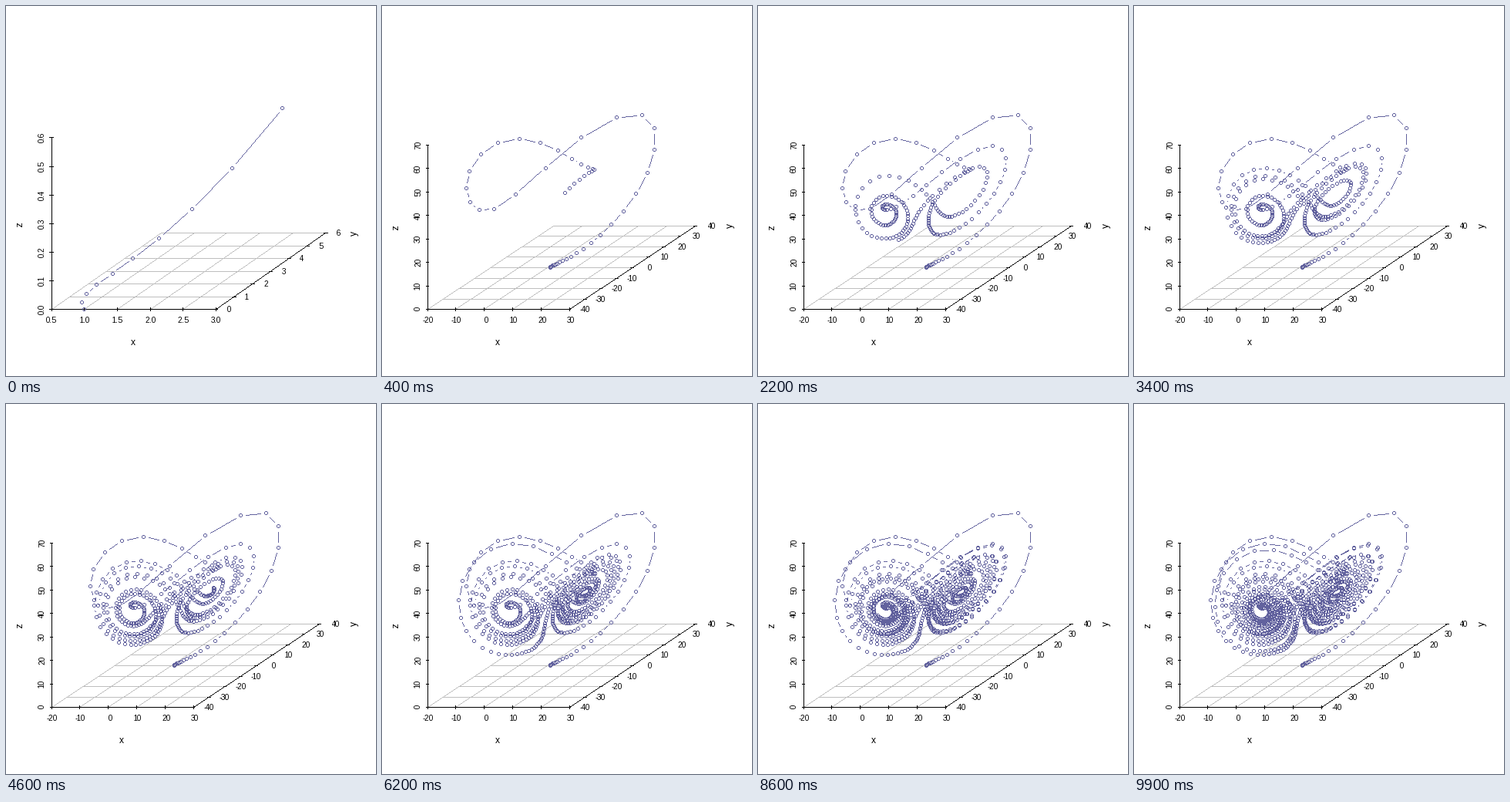
A matplotlib script for the animation above (10000 ms loop, 480 px wide and 480 px high).

```python
import numpy as np
import matplotlib.pyplot as plt
from matplotlib.animation import FuncAnimation

SIZE, DPI = 480, 96
PT = 72 / DPI                       # points per pixel
LINE = 14.4                         # height of one margin line
LEFT, RIGHT = 3.1 * LINE, SIZE - 3.1 * LINE
TOP, BOTTOM = 4.1 * LINE, SIZE - 5.1 * LINE
YX, YZ = 5 / 9, 4 / 9               # depth axis at 40 degrees
BLACK, GRID, INK = (0, 0, 0), (190, 190, 190), (98, 98, 158)

plt.rcParams.update({
    "font.family": "Liberation Sans",
    "text.hinting": "force_autohint",
    "text.hinting_factor": 1,
})

fig = plt.figure(figsize=(SIZE / DPI, SIZE / DPI), dpi=DPI, facecolor="white")
ax = fig.add_axes([0, 0, 1, 1])
ax.axis("off")
canvas = np.full((SIZE, SIZE, 3), 255, np.uint8)
picture = ax.imshow(canvas, extent=(0, SIZE, SIZE, 0), aspect="auto",
                    interpolation="nearest")

# Five-pixel ring: a square outline without its corners
SIDE = np.arange(-2, 3)
DX, DY = np.meshgrid(SIDE, SIDE)
RING = np.maximum(abs(DX), abs(DY)) * (abs(DX) + abs(DY) < 4) == 2
RING = np.stack([DX[RING], DY[RING]], -1)


def lorenz(count, dt=0.02, sigma=10, rho=28, beta=8 / 3):
    """Euler steps of the Lorenz system."""
    pts = np.empty((count, 3))
    x, y, z = 1.0, 0.0, 0.0
    for i in range(count):
        pts[i] = x, y, z
        x, y, z = (x + dt * sigma * (y - x),
                   y + dt * (x * (rho - z) - y),
                   z + dt * (x * y - beta * z))
    return pts


def pretty(lo, hi, n=5):
    """Round tick step, and the first and last tick as multiples of it."""
    cell = (hi - lo) / n
    base = 10.0 ** np.floor(np.log10(cell))
    unit = base
    for mult, bias in ((2, 1.5), (5, 2.75), (10, 1.5)):
        if mult * base - cell < bias * (cell - unit):
            unit = mult * base
    return (unit, int(np.floor(lo / unit + 1e-10)),
            int(np.ceil(hi / unit - 1e-10)))


def tick_labels(unit, first, last):
    digits = 0 if unit >= 1 else int(np.ceil(-np.log10(unit) - 1e-9))
    labels = [f"{i * unit:.{digits}f}" for i in range(first, last + 1)]
    width = max(map(len, labels))
    return [s.rjust(width) for s in labels]


def text_width(s):
    return sum(6 if c.isdigit() else 3 for c in s)


def plot(xy, color):
    """Set single pixels."""
    x, y = np.floor(xy).astype(int).reshape(-1, 2).T
    canvas[y, x] = color


def segments(starts, ends, color):
    """Hard-edged lines, one pixel wide."""
    for p, q in zip(np.floor(np.atleast_2d(starts)),
                    np.floor(np.atleast_2d(ends))):
        steps = int(abs(q - p).max())
        plot(np.linspace(p, q, steps + 1) + 0.5, color)


def label(x, y, s, px=10, rotation=0, ha="center"):
    """Text on its baseline; leading blanks take three pixels each."""
    pad = 3 * (len(s) - len(s.lstrip()))
    shift = pad if ha == "left" else pad / 2
    x, y = (x, y - shift) if rotation else (x + shift, y)
    ax.text(x, y, s.strip(), fontsize=px * PT, rotation=rotation, ha=ha,
            va="baseline", rotation_mode="anchor", color="black")


def draw_plot(pts):
    (ux, x0, x1), (uy, y0, y1), (uz, z0, z1) = (
        pretty(c.min(), c.max()) for c in pts.T)
    z1 += abs(uz - 0.1) < 1e-9      # a step of 0.1 gets one spare tick
    nx, ny, nz = x1 - x0, y1 - y0, z1 - z0
    y_labels = tick_labels(uy, y0, y1)

    # Screen scale, with room on the right for the last depth label
    inner_w, inner_h = (RIGHT - LEFT) / 1.08, (BOTTOM - TOP) / 1.08
    span = nx + YX * ny
    sx = inner_w / (span + text_width(y_labels[-1]) * span / inner_w)
    sz = inner_h / (nz + YZ * ny)
    ox, oz = LEFT + 0.04 * inner_w, BOTTOM - 0.04 * inner_h

    def project(x, y, z):
        x, y, z = np.broadcast_arrays(x, y, z)
        return np.stack([ox + sx * (x + YX * y), oz - sz * (z + YZ * y)], -1)

    ix, iy, iz = np.arange(nx + 1), np.arange(ny + 1), np.arange(nz + 1)
    segments(project(ix, 0, 0), project(ix, ny, 0), GRID)
    segments(project(0, iy, 0), project(nx, iy, 0), GRID)

    # Axes and tick marks
    tz, tx = 0.01 * nz, 0.01 * nx
    for p, q in (
            (project(nx - tx, iy, 0), project(nx + tx, iy, 0)),
            (project(ix, 0, -tz), project(ix, 0, tz)),
            (project(-tx, 0, iz), project(tx, 0, iz)),
            (project(0, 0, 0), project(nx, 0, 0)),
            (project(nx, 0, 0), project(nx, ny, 0)),
            (project(0, 0, 0), project(0, 0, nz))):
        segments(p, q, BLACK)

    for (x, _), s in zip(project(ix, 0, 0), tick_labels(ux, x0, x1)):
        label(x, 411, s)
    for (_, y), s in zip(project(0, 0, iz), tick_labels(uz, z0, z1)):
        label(50, y, s, rotation=90)
    for (x, y), s in zip(project(nx, iy, 0), y_labels):
        label(np.floor(x + LINE), np.floor(y) + 4, s, ha="left")
    label(ox + sx * nx / 2 - 0.9, 440, "x", px=12)
    label(21, oz - sz * nz / 2, "z", px=12, rotation=90)
    label(455, oz - sz * YZ * ny, "y", px=12, rotation=90)

    # Links stop half a line short of each point
    p = project(pts[:, 0] / ux - x0, pts[:, 1] / uy - y0, pts[:, 2] / uz - z0)
    d = np.diff(p, axis=0)
    dist = np.hypot(*d.T)
    far = dist > LINE
    trim = d[far] / dist[far, None] * LINE / 2
    segments(p[:-1][far] + trim, p[1:][far] - trim, INK)
    plot(np.floor(p)[:, None] + RING, INK)


path = lorenz(1000)
# The complete curve flashes up once, right after the first hundred points
counts = list(range(10, 101, 10)) + [1000] + list(range(110, 1000, 10))


def update(i):
    for text in list(ax.texts):
        text.remove()
    canvas[:] = 255
    draw_plot(path[:counts[i]])
    picture.set_data(canvas)
    return []


anim = FuncAnimation(fig, update, frames=len(counts), interval=100,
                     init_func=lambda: [], repeat=True, repeat_delay=0)
plt.show()
```
